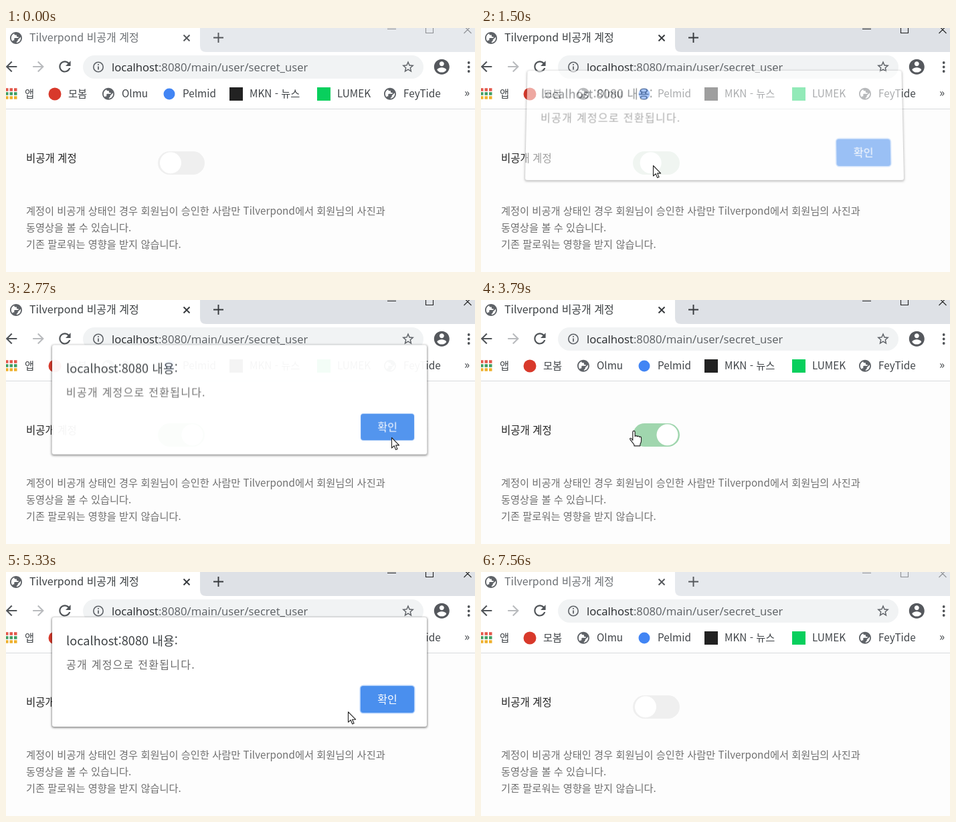
These frames come from a looping animation (701 by 366 pixels, 7690 ms). An HTML page:

```html
<!DOCTYPE html>
<html lang="ko">
<head>
<meta charset="utf-8">
<title>Private account</title>
<style>
html, body { margin: 0; width: 100%; height: 100%; overflow: hidden; background: #fdfdfd; }
body, text { font-family: "Noto Sans CJK KR", "Noto Sans CJK", sans-serif; font-weight: 300; }
svg { position: absolute; left: 0; top: 0; display: block; }
#strip { fill: #dee1e6; }
#tab { fill: #3c4043; }
#signs { stroke: #36393d; }
#win { stroke: #222; }
.idle #strip { fill: #e6e9ed; }
.idle #tab { fill: #6c7074; }
.idle #signs { stroke: #54575b; }
.idle #win { stroke: #8e9094; }
.marks { font-size: 15.3px; fill: #3f4347; }
.note { font-size: 15.25px; fill: #707070; }
#dialog {
  position: absolute; left: 69px; top: 68px; width: 560px; height: 164px;
  background: #fff; border-radius: 3px; box-shadow: 0 1px 3px 1px rgba(0,0,0,.42);
}
#dialog div { position: absolute; left: 21px; white-space: nowrap; line-height: 24px; }
#dialog .host { top: 22px; font-size: 18.2px; font-weight: 400; color: #3c4043; }
#dialog #msg { top: 58px; font-size: 16px; letter-spacing: 1.25px; color: #6c6c6c; }
#dialog #ok {
  left: 461px; top: 103px; width: 80px; height: 40px; border-radius: 4px;
  background: #4a8fee; color: #fff; font-size: 16px; font-weight: 500; line-height: 38px; text-align: center;
}
#dialog #ok.focus { box-shadow: 0 0 0 1.5px #b4d2fb; }
</style>
</head>
<body>
<svg id="page" width="701" height="366">
  <defs>
    <symbol id="globe" viewBox="0 0 24 24"><path transform="matrix(-1 0 0 1 24 0)" d="M12 2C6.48 2 2 6.48 2 12s4.48 10 10 10 10-4.48 10-10S17.52 2 12 2zm-1 17.93c-3.95-.49-7-3.85-7-7.93 0-.62.08-1.21.21-1.79L9 15v1c0 1.1.9 2 2 2v1.93zm6.9-2.54c-.26-.81-1-1.39-1.9-1.39h-1v-3c0-.55-.45-1-1-1H8v-2h2c.55 0 1-.45 1-1V7h2c1.1 0 2-.9 2-2v-.41c2.93 1.19 5 4.06 5 7.41 0 2.08-.8 3.97-2.1 5.39z"/></symbol>
    <symbol id="arrow" viewBox="0 0 24 24"><path d="M20 11H7.83l5.59-5.59L12 4l-8 8 8 8 1.41-1.41L7.83 13H20z"/></symbol>
  </defs>

  <rect id="strip" width="701" height="36"/>
  <path d="M0 0H290V27q0 9 9 9V122H0z" fill="#fff"/>
  <rect y="36" width="701" height="85" fill="#fff"/>
  <path d="M0 121.5H701" stroke="#d8dadd"/>
  <use href="#globe" x="4.2" y="4.2" width="21.6" height="21.6" fill="#5f6368"/>
  <text id="tab" x="35" y="20" font-size="16">Tilverpond 비공개 계정</text>
  <path id="signs" d="M265.5 10.5l9 9m0-9l-9 9M317.5 7v15M310 14.5h15" stroke-width="1.9"/>
  <path id="win" d="M570 1.5h13M627.5-3V7.5h11V-3M684.5 8l11-11m0 11l-11-11" fill="none" stroke-width="1.1"/>

  <use href="#arrow" x="-4.5" y="45.5" width="25" height="25" fill="#4f5357"/>
  <use href="#arrow" transform="translate(61 45.5) scale(-1 1)" width="25" height="25" fill="#b9bbbe"/>
  <path transform="translate(75 45) scale(1.08)" fill="#4f5357" d="M17.65 6.35C16.2 4.9 14.21 4 12 4c-4.42 0-7.99 3.58-7.99 8s3.57 8 7.99 8c3.73 0 6.84-2.55 7.73-6h-2.08c-.82 2.33-3.04 4-5.65 4-3.31 0-6-2.69-6-6s2.69-6 6-6c1.66 0 3.14.69 4.22 1.78L13 11h7V4z"/>
  <rect x="115" y="41" width="509" height="35" rx="17.5" fill="#f1f3f4"/>
  <circle cx="138" cy="58.5" r="7.2" fill="none" stroke="#5f6368" stroke-width="1.6"/>
  <path d="M138 57.5v5M138 54v1.8" stroke="#5f6368" stroke-width="1.8"/>
  <text x="158" y="65" font-size="16.7" fill="#5b5f63" style="font-family:'Open Sans',sans-serif;font-weight:400"><tspan fill="#25282b">localhost</tspan>:8080/main/user/secret_user</text>
  <path transform="translate(590.2 47.5) scale(.9)" fill="#5f6368" d="M22 9.24l-7.19-.62L12 2 9.19 8.63 2 9.24l5.46 4.73L5.82 21 12 17.27 18.18 21l-1.63-7.03zM12 15.4l-3.76 2.27 1-4.28-3.32-2.88 4.38-.38L12 6.1l1.71 4.04 4.38.38-3.32 2.88 1 4.28z"/>
  <path transform="translate(637.5 44.5) scale(1.15)" fill="#55585d" d="M12 2C6.48 2 2 6.48 2 12s4.48 10 10 10 10-4.48 10-10S17.52 2 12 2zm0 3c1.66 0 3 1.34 3 3s-1.34 3-3 3-3-1.34-3-3 1.34-3 3-3zm0 14.2c-2.5 0-4.71-1.28-6-3.22.03-1.99 4-3.08 6-3.08 1.99 0 5.97 1.09 6 3.08-1.29 1.94-3.5 3.22-6 3.22z"/>
  <path d="M691.7 52h0m0 6.5h0m0 6.5h0" stroke="#4f5357" stroke-width="3.8" stroke-linecap="round"/>

  <g stroke-width="4.5" stroke-dasharray="4.5 2">
    <path d="M-1 92.5H16.5" stroke="#e2574a"/>
    <path d="M-1 98.5H16.5" stroke="#3f9d62"/>
    <path d="M-1 104.5H16.5" stroke="#eeb02c"/>
  </g>
  <circle cx="73" cy="99" r="9.5" fill="#d8392b"/>
  <use href="#globe" x="142.2" y="88" width="21.6" height="21.6" fill="#5f6368"/>
  <circle cx="244" cy="99" r="8.5" fill="#4285f4"/>
  <path d="M334 89h20v20h-20z" fill="#222"/>
  <path d="M465 89h20v20h-20z" fill="#08cf5d"/>
  <use href="#globe" x="563.2" y="88" width="21.6" height="21.6" fill="#5f6368"/>
  <g class="marks">
    <text x="28" y="104">앱</text>
    <text x="93" y="104">모봄</text>
    <text x="173" y="104">Olmu</text>
    <text x="264" y="104">Pelmid</text>
    <text x="364" y="104">MKN - 뉴스</text>
    <text x="495" y="104">LUMEK</text>
    <text x="594" y="104">FeyTide</text>
    <text x="685" y="103" font-size="17">»</text>
  </g>

  <text x="30" y="201" font-size="15.5" fill="#222">비공개 계정</text>
  <rect id="track" x="227" y="185" width="70" height="35" rx="17.5"/>
  <circle id="knob" cy="202.2" r="16" fill="#fff"/>
  <g class="note">
    <text x="30" y="280">계정이 비공개 상태인 경우 회원님이 승인한 사람만 Tilverpond에서 회원님의 사진과</text>
    <text x="30" y="305">동영상을 볼 수 있습니다.</text>
    <text x="30" y="330">기존 팔로워는 영향을 받지 않습니다.</text>
  </g>
</svg>

<div id="dialog">
  <div class="host">localhost:8080 내용:</div>
  <div id="msg"></div>
  <div id="ok">확인</div>
</div>

<svg width="701" height="366">
  <g id="cursor" fill="#fff" stroke="#222" stroke-width="1.1" stroke-linejoin="round">
    <path id="pointer" d="M.5.5V16l3.7-3.3 2.5 5.9 2.4-1-2.5-5.7h5z"/>
    <path id="hand" transform="translate(-6.5 -.5) scale(1.06)" d="M5 14V2.5a1.6 1.6 0 0 1 3.2 0V8.5c.3-1.3 3-1.2 3.2.3 .4-1 2.8-.8 3 .7 .5-.9 2.6-.5 2.6 1.2V15c0 2.5-1.6 3.5-1.6 5.5V22H7v-1.5C6 18 2 14.5 1.2 12.5c-.5-1.6 1.5-2.6 3.8 1.5z"/>
  </g>
</svg>

<script>
const LOOP = 7690, START = 540, STEP = 63.6;
const $ = id => document.getElementById(id);
const ramp = (t, from, length) => Math.min(1, Math.max(0, (t - from) / length));
const mix = (a, b, p) => a + (b - a) * p;

// cursor path: time, x, y
const path = [
  [540, 210, 310], [1180, 257, 206], [1940, 257, 206], [2300, 410, 180],
  [2640, 576, 206], [2840, 576, 206], [3100, 430, 238], [3410, 300, 240],
  [3770, 228, 196], [3860, 228, 196], [3980, 207, 193], [4230, 248, 196],
  [4620, 248, 196], [4850, 330, 262], [5100, 430, 232], [5450, 555, 197],
  [6030, 555, 197], [6300, 430, 315], [6640, 285, 293], [6950, 152, 172]
];

function cursorAt(t) {
  const i = path.findIndex(k => k[0] > t);
  if (i < 1) return null;
  const [a, b] = [path[i - 1], path[i]];
  const p = ramp(t, a[0], b[0] - a[0]), e = p * p * (3 - 2 * p);
  return [mix(a[1], b[1], e), mix(a[2], b[2], e)];
}

function draw(now) {
  let t = now % LOOP;
  $("page").classList.toggle("idle", t < 1310 || t >= 7560);
  if (t > START) t = START + Math.floor((t - START) / STEP) * STEP;

  const on = ramp(t, 1400, 400) - ramp(t, 4523, 400);
  $("knob").setAttribute("cx", mix(246, 278.5, on));
  $("track").setAttribute("fill", `rgb(${mix(239, 160, on)},${mix(239, 214, on)},${mix(239, 174, on)})`);

  const show = ramp(t, 1382, 200) - ramp(t, 2757, 180) + ramp(t, 4395, 200) - ramp(t, 5820, 180);
  const away = 1 - show;
  $("dialog").style.opacity = show;
  $("dialog").style.transform =
    `translateY(${-10 * away}px) perspective(1000px) rotateX(${10 * away}deg) scale(${1 + away * .01})`;
  $("msg").textContent = (t < 4000 ? "비공개" : "공개") + " 계정으로 전환됩니다.";

  const at = cursorAt(t);
  $("cursor").style.display = at ? "" : "none";
  if (at) {
    const [x, y] = at;
    const hover = show < .01 && x >= 227 && x <= 297 && y >= 185 && y <= 220;
    $("cursor").setAttribute("transform", `translate(${x} ${y})`);
    $("hand").style.display = hover ? "" : "none";
    $("pointer").style.display = hover ? "none" : "";
    $("ok").classList.toggle("focus", x < 530);
  }
  requestAnimationFrame(() => draw(performance.now() - begin));
}
const begin = performance.now();
draw(0);
</script>
</body>
</html>
```
